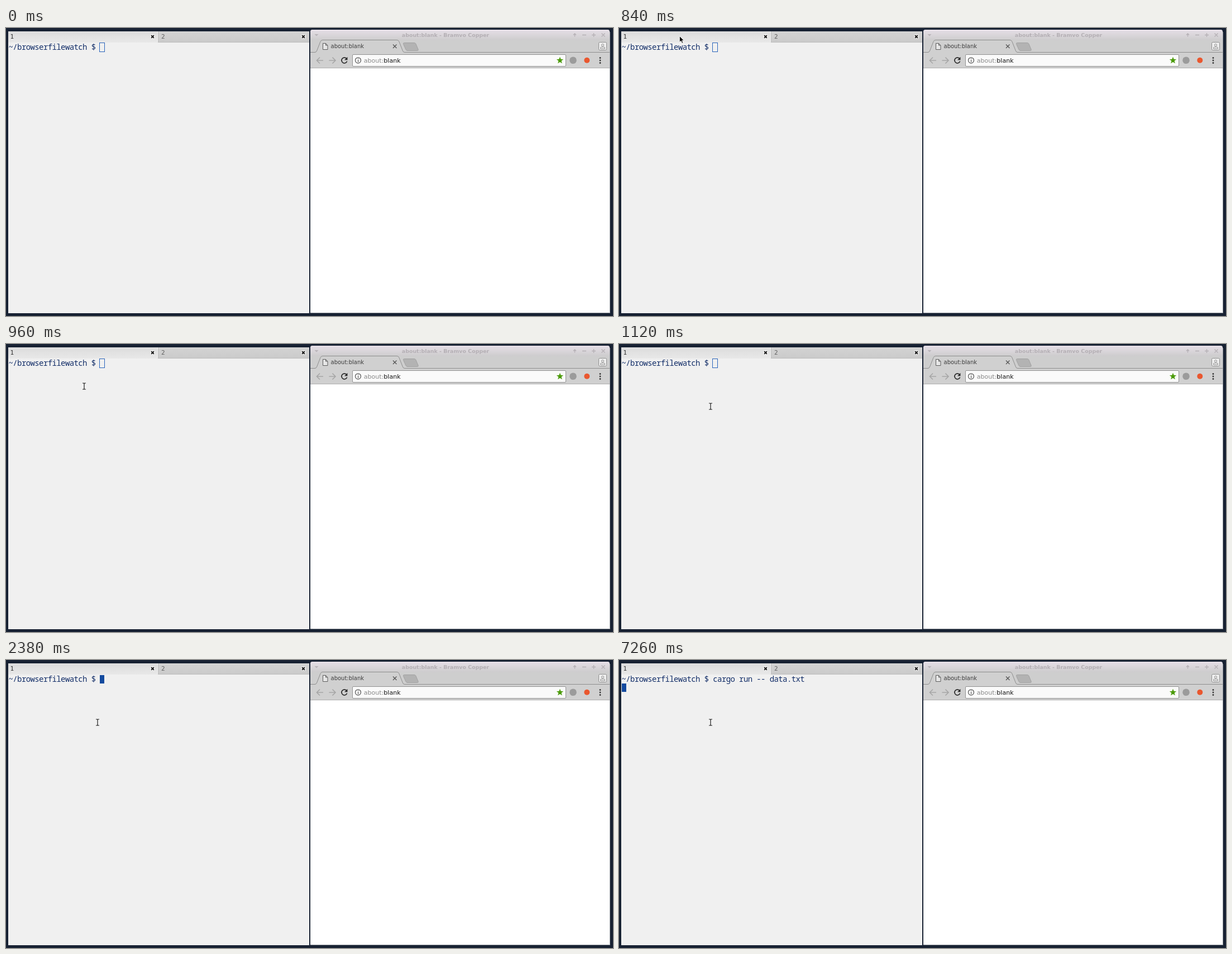
Animation, 1087 px wide and 515 px high, one loop 8000 ms. Source, as an HTML page:

```html
<!DOCTYPE html>
<html lang="en">
<head>
<meta charset="utf-8">
<title>Terminal and browser</title>
<style>
  html, body { margin: 0; width: 100%; height: 100%; overflow: hidden; background: #172132; }
  svg { display: block; width: 1087px; height: 515px; }
  text { white-space: pre; }
  .sans { font-family: "DejaVu Sans", sans-serif; }
  .term { font: 14px "Noto Sans Mono", monospace; letter-spacing: -.6px; fill: #142f69; }
  .tab { font: 11px "DejaVu Sans Mono", monospace; }
  .line { fill: none; stroke-width: 1; }
</style>
</head>
<body>
<svg viewBox="0 0 1087 515" xmlns="http://www.w3.org/2000/svg">
  <defs>
    <linearGradient id="title" x2="0" y2="1">
      <stop offset="0" stop-color="#e6dfe7"/>
      <stop offset="1" stop-color="#cdcccd"/>
    </linearGradient>
    <linearGradient id="front" x2="0" y2="1">
      <stop offset="0" stop-color="#dcdcdc"/>
      <stop offset="1" stop-color="#e8e8e8"/>
    </linearGradient>
    <linearGradient id="back" x2="0" y2="1">
      <stop offset="0" stop-color="#d3d3d3"/>
      <stop offset="1" stop-color="#cacaca"/>
    </linearGradient>
    <g id="close">
      <rect x="-4" y="-4" width="8" height="8" rx="1" fill="#f4f4f4" opacity=".7"/>
      <path d="M-2.3-2.3 2.3 2.3M2.3-2.3-2.3 2.3" stroke="#000" stroke-width="1.8"/>
    </g>
  </defs>

  <rect width="1087" height="515" fill="#172132"/>

  <!-- terminal -->
  <rect x="4" y="6" width="539" height="504" fill="#f0f0f0"/>
  <rect x="4" y="6" width="268" height="20" fill="url(#front)"/>
  <rect x="272" y="6" width="271" height="20" fill="url(#back)"/>
  <path class="line" d="M272.5 6V25.5H543" stroke="#bdbdbd"/>
  <path class="line" d="M271.5 6V25" stroke="#f2f2f2"/>
  <text class="tab" x="7.5" y="19" fill="#2e2e2e">1</text>
  <text class="tab" x="278" y="19" fill="#606060">2</text>
  <use href="#close" x="262.5" y="15.5"/>
  <use href="#close" x="532.5" y="15.5"/>
  <text class="term" x="4.5" y="39">~/browserfilewatch $ <tspan id="cmd"></tspan></text>
  <rect id="caret"/>

  <!-- browser window -->
  <path d="M545 509.500V7q0-4 4-4H1077q4 0 4 4V509.500Z" fill="#cecece"/>
  <path d="M545 22V7q0-4 4-4H1077q4 0 4 4V22Z" fill="url(#title)"/>
  <text class="sans" x="787" y="16.300" font-size="9.450" font-weight="700" text-anchor="middle" fill="#b4afb4">about:blank - Bramvo Copper</text>
  <path d="M552.500 11h7l-3.500 3.500Z" fill="#b9b4b9"/>
  <g class="line" stroke="#b5b0b5" style="stroke-width:1.400">
    <path d="M1018.500 15.500V10.500M1016 12.500l2.500-2.500 2.500 2.500"/>
    <path d="M1032 12.500h7M1049 12.500h7M1052.500 9v7M1066.500 9.500l6 6M1072.500 9.500l-6 6"/>
  </g>

  <!-- tab strip -->
  <path d="M545 43.500H553q2.500 0 3.500-2.500l6.500-16.500q1-3 4-3H700q3 0 4 3L710.500 41q1 2.500 3.500 2.500H1081V72H545Z" fill="#d0d0d0"/>
  <path class="line" d="M545 43.500H553q2.500 0 3.500-2.500l6.500-16.500q1-3 4-3H700q3 0 4 3L710.500 41q1 2.500 3.500 2.500H1081" stroke="#8e8e8e"/>
  <path d="M713.500 26.500H731q2 0 3 2l4 9.500q1 2.500-1.500 2.500H719q-2 0-3-2l-4.500-10q-.500-2 2-2Z" fill="#b3b3b3" stroke="#a1a1a1"/>
  <path d="M567.500 27.500h5l3.500 3.500v7.500h-8.500ZM572.500 27.500V31h3.500" fill="#e6e6e6" stroke="#5c5c5c"/>
  <text class="sans" x="581.500" y="36" font-size="10" fill="#3b3b3b">about:blank</text>
  <path class="line" d="M693 29.500l6.500 6.500M699.500 29.500l-6.500 6.500" stroke="#555" style="stroke-width:1.300"/>
  <rect x="1061.500" y="25.500" width="14" height="14" rx="2" fill="#eee" stroke="#8f8f8f"/>
  <g class="line" stroke="#8a8a8a">
    <circle cx="1068.500" cy="30.500" r="2"/>
    <path d="M1064.500 37v-1q0-2 2-2h4q2 0 2 2v1Z"/>
  </g>

  <!-- toolbar -->
  <g class="line" stroke="#a6a6a6" style="stroke-width:1.600">
    <path d="M568 58H557M562 52.500L556.500 58l5.500 5.500"/>
    <path d="M578.500 58H589.500M584.500 52.500L590 58l-5.500 5.500"/>
  </g>
  <path class="line" d="M609.600 54.300A5 5 0 1 0 610.700 59.500" stroke="#2b2b2b" style="stroke-width:1.700"/>
  <path d="M611.500 51.800V57.300H606Z" fill="#2b2b2b"/>
  <rect x="620.500" y="47.500" width="382" height="21" rx="1.500" fill="#fafafa" stroke="#929292"/>
  <circle class="line" cx="630.500" cy="57.800" r="5" stroke="#555" style="stroke-width:1.200"/>
  <path d="M630 54.500h1.200v1.300h-1.200ZM630 57h1.200v4h-1.200Z" fill="#555"/>
  <text class="sans" x="640.700" y="61.500" font-size="11.050" fill="#888">about:<tspan fill="#111">blank</tspan></text>
  <path id="star" fill="#4a9a08"/>
  <circle cx="1015.500" cy="57.800" r="6.300" fill="#9b9b9b"/>
  <circle cx="1040.300" cy="57.800" r="5" fill="#e9572f"/>
  <g fill="#333">
    <circle cx="1064" cy="53.500" r="1.400"/>
    <circle cx="1064" cy="58" r="1.400"/>
    <circle cx="1064" cy="62.500" r="1.400"/>
  </g>
  <path class="line" d="M545 71.500H1081" stroke="#adadad"/>
  <rect x="545" y="72" width="536" height="437" fill="#fff"/>
  <path class="line" d="M545 509.500H1081M1081.500 7V510" stroke="#8d929a"/>

  <!-- pointers, drawn around their hot spots -->
  <path id="arrow" d="M.5.5V11.300L3 9 5 13.200 6.800 12.300 4.900 8.300H8.200Z" fill="#000" stroke="#fff" stroke-width=".8"/>
  <g id="beam" class="line">
    <path d="M-3-5.500H-1Q0-5.500 0-4.500V4.500Q0 5.500-1 5.500H-3M3-5.500H1Q0-5.500 0-4.500M3 5.500H1Q0 5.500 0 4.500" stroke="#fff" stroke-width="2.600"/>
    <path d="M-3-5.500H-1Q0-5.500 0-4.500V4.500Q0 5.500-1 5.500H-3M3-5.500H1Q0-5.500 0-4.500M3 5.500H1Q0 5.500 0 4.500" stroke="#111" stroke-width="1.200"/>
  </g>
</svg>
<script>
const LOOP = 8000, FOCUS = 2380, TYPED = 4780, ENTER = 7260;
const MOVES = [820, 840, 880, 920, 960, 980, 1040, 1120];
const $ = id => document.getElementById(id);
const cmd = $("cmd"), caret = $("caret"), arrow = $("arrow"), beam = $("beam");

function set(el, attrs) {
  for (const name in attrs) el.setAttribute(name, attrs[name]);
}

function starPath(cx, cy, outer, inner) {
  const points = Array.from({ length: 10 }, (_, i) => {
    const r = i % 2 ? inner : outer, a = i * Math.PI / 5 - Math.PI / 2;
    return (cx + r * Math.cos(a)).toFixed(2) + " " + (cy + r * Math.sin(a)).toFixed(2);
  });
  return "M" + points.join("L") + "Z";
}

function drawPointer(t) {
  const step = MOVES.filter(m => m <= t).pop();
  const shown = step !== undefined;
  const left = shown ? 1 - (step - 820) / 300 : 1;
  const x = Math.round(102 + 62 * (1 - left ** 1.51));
  const y = Math.round(1 + 110 * (1 - left ** 1.78));
  const overTabs = y < 26;
  set(arrow, { display: shown && overTabs ? "inline" : "none", transform: `translate(${x} ${y})` });
  set(beam, { display: shown && !overTabs ? "inline" : "none", transform: `translate(${x} ${y + .5})` });
}

function drawCaret(t) {
  if (t < FOCUS) {
    set(caret, { x: 167.5, y: 26.5, width: 9, height: 16, fill: "none", stroke: "#2a64bb" });
    return;
  }
  const x = t < TYPED ? 168 : t < ENTER ? 339.5 : 5;
  set(caret, { x, y: t < ENTER ? 27 : 42, width: 8, height: 15, fill: "#134a9e", stroke: "none" });
}

function draw(t) {
  cmd.textContent = t < TYPED ? "" : "cargo run -- data.txt";
  drawCaret(t);
  drawPointer(t);
}

set($("star"), { d: starPath(992, 58, 6.5, 2.7) });
const start = performance.now();
function tick() {
  draw((performance.now() - start) % LOOP);
  requestAnimationFrame(tick);
}
tick();
</script>
</body>
</html>
```
